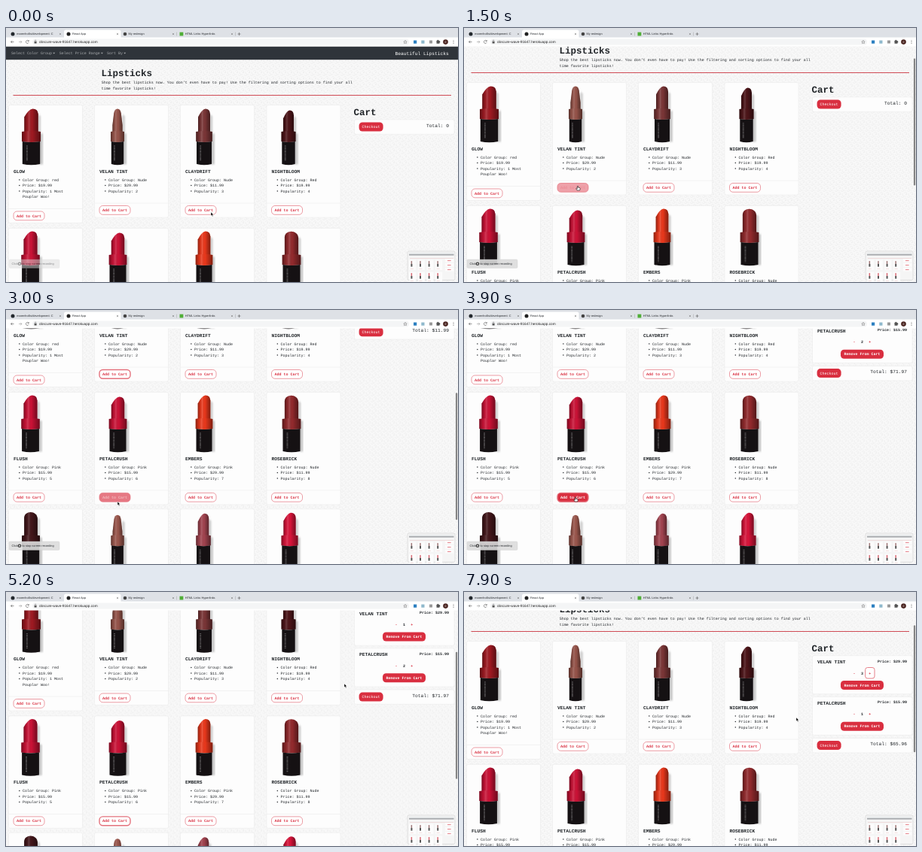
An HTML page that plays this animation: 600x338 px, repeating every 8000 ms.

```html
<!DOCTYPE html>
<html lang="en">
<head>
<meta charset="utf-8">
<title>Lipstick shop</title>
<style>
html, body { margin: 0; width: 100%; height: 100%; overflow: hidden; background: #f6f6f6; }
svg { display: block; width: 600px; height: 338px; }
text { font-family: "Liberation Mono", "Courier New", monospace; text-rendering: geometricPrecision; white-space: pre; }
.sans { font-family: "Liberation Sans", Arial, sans-serif; }
</style>
</head>
<body>
<svg id="stage" viewBox="0 0 600 338"></svg>
<script>
const RED = '#d92f40', INK = '#212529', EDGE = '#e4727d';
const COLS = [3.5, 117.5, 231.5, 346], ROWS = [102.5, 266.4, 421.8];

// name, colour group, price, popularity, tube centre, half width, tip top, colour, shape
const products = [
  ['GLOW', 'red', '19.99', '1 Most', 30, 12.5, 5, '#9f1a22', 0],
  ['VELAN TINT', 'Nude', '29.99', '2', 30.5, 9, 5, '#96544a', 1],
  ['CLAYDRIFT', 'Nude', '11.99', '3', 31.5, 10.8, 5, '#7b3637', 0],
  ['NIGHTBLOOM', 'Red', '19.99', '4', 29, 9.5, 7, '#4d1519', 0],
  ['FLUSH', 'Pink', '15.99', '5', 29, 12.2, 4, '#cb1236', 0],
  ['PETALCRUSH', 'Pink', '15.99', '6', 31, 11.8, 6, '#cb1236', 0],
  ['EMBERS', 'Pink', '29.99', '7', 31.5, 11.3, 4, '#ea381c', 0],
  ['ROSEBRICK', 'Nude', '11.99', '8', 33, 12.3, 4, '#932a2d', 2],
  ['DEEP PLUM', 'Red', '19.99', '9', 29.5, 12, 4, '#43171b', 2],
  ['SOFT CLAY', 'Nude', '29.99', '10', 30.5, 8.7, 8, '#9b574d', 1],
  ['DUSTY TINT', 'Nude', '11.99', '11', 30.5, 9.8, 6, '#a34450', 0],
  ['BRIGHT PINK', 'Pink', '15.99', '12', 30.5, 11, 5, '#d8143a', 0]
];

const text = (x, y, size, str, fill = INK, attrs = '') =>
  `<text x="${x}" y="${y}" font-size="${size}" fill="${fill}" ${attrs}>${str}</text>`;
const bold = (x, y, size, str, fill = INK, attrs = '') => text(x, y, size, str, fill, 'font-weight="700" ' + attrs);
const sans = (x, y, size, str, fill = '#2b2e32') => text(x, y, size, str, fill, 'class="sans"');
const rect = (x, y, w, h, fill, r = 0, attrs = '') =>
  `<rect x="${x}" y="${y}" width="${w}" height="${h}" fill="${fill}" rx="${r}" ${attrs}/>`;
const dot = (x, y, r, fill) => `<circle cx="${x}" cy="${y}" r="${r}" fill="${fill}"/>`;
const line = (d, color, w = .6, attrs = '') =>
  `<path d="${d}" fill="none" stroke="${color}" stroke-width="${w}" ${attrs}/>`;
const group = (id, body, attrs = '') => `<g id="${id}" ${attrs}>${body}</g>`;
const panel = (x, y, w, h) => rect(x, y, w, h, '#fdfdfd', 2, 'stroke="#e4e4e4" stroke-width=".4"');

function lipstick(cx, hw, top, color, shape) {
  const a = hw * .74, b = a * .72;
  const tip = [
    `M${-a} 36V${top + 11}Q${-a * .4} ${top + 1} ${a * .2} ${top}Q${a * .95} ${top} ${a} ${top + 7}V36Z`,
    `M${-a} 36V${top + 22}L${-b} ${top + 6}Q${-b * .8} ${top} 0 ${top}Q${b * .8} ${top} ${b} ${top + 6}L${a} ${top + 22}V36Z`,
    `M${-a} 36V${top + 8}C${-a} ${top - 2} ${a * .9} ${top - 3} ${a} ${top + 9}V36Z`
  ][shape];
  const collar = `M${-hw} 35.5Q0 33.5 ${hw} 35.5V48.5Q0 50.5 ${-hw} 48.5Z`;
  const base = `M${-hw + .8} 48.5Q0 50.5 ${hw - .8} 48.5V78.5Q0 81 ${-hw + .8} 78.5Z`;
  const solid = (d, fill) => `<path d="${d}" fill="${fill}"/><path d="${d}" fill="url(#shade)"/>`;
  return `<g transform="translate(${cx} 0)">`
    + `<path d="M${a} ${top + 7}L${a + 3} ${top + 10}V38H${hw + 3}V79H${a}Z" fill="#777" opacity=".4" filter="url(#soft)"/>`
    + solid(tip, color) + solid(collar, color) + `<path d="${base}" fill="#151113"/>`
    + line(`M${-hw * .45} 54V75`, '#bbb', 2, 'stroke-dasharray=".8 1.1" opacity=".6"')
    + '</g>';
}

function card([name, tone, price, rank, cx, hw, top, color, shape], i) {
  const extra = i ? 0 : 7.5;
  const rows = ['Color Group: ' + tone, 'Price: $' + price, 'Popularity: ' + rank];
  const list = rows.map((s, k) => dot(14.3, 99.6 + k * 7.5, .75, INK) + text(18.5, 101.2 + k * 7.5, 5, s)).join('');
  return `<g transform="translate(${COLS[i % 4]} ${ROWS[i >> 2]})">`
    + panel(0, 0, 98, 149.5 + extra) + lipstick(cx, hw, top, color, shape)
    + bold(6.5, 90.4, 6.25, name) + list + (i ? '' : text(18.5, 123.7, 5, 'Pouplar Woo!'))
    + rect(0, 130.3 + extra, 98, .5, '#e6e6e6')
    + rect(6.5, 134 + extra, 41, 11.8, '#fff', 4.5, `id="btn${i}" stroke="${EDGE}" stroke-width=".7"`)
    + bold(10.5, 141.6 + extra, 5, 'Add to Cart', RED, `id="label${i}"`) + '</g>';
}

const cartItem = (id, name, price) => group(id,
  panel(462.5, 121.7, 132.5, 51) + bold(469, 132, 6.25, name)
  + bold(588, 130.6, 5, 'Price: $' + price, INK, 'text-anchor="end"')
  + (id == 'item0' ? rect(532.7, 137.5, 12.3, 14.5, '#fff', 3, `id="plus" stroke="${EDGE}" stroke-width=".9"`) : '')
  + bold(518, 146.6, 5, '-', RED, 'text-anchor="middle"')
  + bold(528.5, 146.6, 5, '1', INK, `id="${id}n" text-anchor="middle"`)
  + bold(538.7, 146.6, 5, '+', RED, 'text-anchor="middle"')
  + rect(500, 155, 57, 12, RED, 4.5) + bold(504.5, 162.6, 5, 'Remove From Cart', '#fff'));

const caret = x => `<path d="M${x} 32.8h3l-1.5 1.6z" fill="#a8abae"/>`;
const menu = ['Select Color Group', 'Select Price Range', 'Sort By'];
const page = rect(0, 24, 600, 600, 'url(#curl)')
  + rect(0, 24.5, 600, 17.7, '#2f343a')
  + [7, 70.7, 134].map((x, i) => text(x, 35, 5, menu[i], '#a8abae') + caret(x + menu[i].length * 3 + 1.2)).join('')
  + text(516.5, 35.8, 6.25, 'Beautiful Lipsticks', '#fff')
  + bold(126.5, 63.8, 12.5, 'Lipsticks')
  + text(126.8, 74.4, 5, "Shop the best lipsticks now. You don't even have to pay! Use the filtering and sorting options to find your all")
  + text(126.8, 82, 5, 'time favorite lipsticks!')
  + rect(9.5, 89, 581.5, 1, '#cf4a54')
  + products.map(card).join('')
  + bold(461.5, 115.8, 12.5, 'Cart')
  + cartItem('item0', products[1][0], '29.99') + cartItem('item1', products[5][0], '15.99')
  + group('foot', panel(462.5, 122, 132.5, 19.3) + rect(468.6, 125.5, 32, 12, RED, 4.5)
    + text(472.6, 133.2, 5, 'Checkout', '#fff')
    + text(588, 131.5, 6.25, 'Total: 0', INK, 'id="total" text-anchor="end"'));

const cross = x => line(`M${x - 1.1} 6.9l2.2 2.2m0-2.2l-2.2 2.2`, '#666', .5);
const browser = rect(0, 0, 600, 13, '#dee1e6') + rect(0, 12.5, 600, 12, '#fff')
  + rect(77, 2.5, 75.5, 12, '#fff', 2.5)
  + dot(9, 8, 2.5, '#24292e') + sans(14.3, 9.4, 3.9, 'marenhollis/development: C')
  + dot(83, 8, 2.5, '#222') + sans(88, 9.4, 3.9, 'React App')
  + dot(158, 8, 2.3, '#444') + sans(162.5, 9.4, 3.9, 'My redesign')
  + rect(230.5, 5.6, 4.8, 4.8, '#4fae36') + sans(237.7, 9.4, 3.9, 'HTML Links Hyperlinks')
  + [72, 148, 222, 300].map(cross).join('')
  + line('M226.5 5.5v5M304.5 5.5v5', '#999', .4) + line('M307.5 8h4m-2-2v4', '#555')
  + line('M10.5 18.5h-4m1.8-1.8l-1.8 1.8 1.8 1.8', '#555')
  + line('M17 18.5h4m-1.8-1.8l1.8 1.8-1.8 1.8', '#999')
  + line('M30 17.3a2 2 0 1 0 .2 2M30.3 16v1.7h-1.7', '#555')
  + rect(35, 14.6, 500, 8, '#f4f5f6', 4)
  + rect(37.6, 18, 3, 2.6, '#555', .4) + line('M38.2 18v-1a.9.9 0 0 1 1.8 0v1', '#555', .5)
  + sans(44, 20.2, 4.72, 'obscure-wave-91647.herokuapp.com', '#222')
  + line('M530 16.4l.7 1.4 1.5.2-1.1 1 .3 1.5-1.4-.7-1.4.7.3-1.5-1.1-1 1.5-.2z', '#555', .45)
  + rect(541, 16.5, 4.2, 4.2, '#2b7fc0') + rect(551.3, 16.5, 4.2, 4.2, '#8fb9cc') + rect(562, 16.5, 4, 4, '#999')
  + rect(571.5, 16.8, 4, 4, '#555', .5) + dot(575.4, 18.6, 1, '#555') + dot(573.3, 16.7, 1, '#555')
  + dot(583.5, 18.6, 3.3, '#4a2420') + sans(582.5, 19.9, 3.4, 'E', '#fff')
  + [16.8, 18.6, 20.4].map(y => dot(594, y, .5, '#555')).join('');

let preview = rect(533, 297, 63, 38.5, '#f5f5f5', 2, 'stroke="#d9d9d9" stroke-width=".8"')
  + rect(535, 301, 59.5, 1.6, '#a3a6aa') + rect(535, 299, 59.5, 1.8, '#e4e6e8') + rect(536, 306, 58, .4, '#e3b4b4');
for (let i = 0; i < 8; i++) {
  const x = 538.3 + i % 4 * 11.6, y = i < 4 ? 310 : 326;
  preview += rect(x - 3, y - 1.5, 9, 13.5, '#fcfcfc') + rect(x - .7, y, 1.5, 4, i < 4 ? '#a07878' : '#d86a74', .6)
    + rect(x - .9, y + 4, 2, 3.6, '#555') + rect(x - 1.5, y + 10, 4, .4, '#e4b0b0');
}
preview += [309, 315, 321].map(y => rect(583, y - 2, 11.5, 4.8, '#fcfcfc') + rect(586, y, 4.6, 1.1, '#e88992')).join('');

const toast = rect(4, 308, 67, 11.5, '#dcdcdc', 1.5, 'opacity=".9" stroke="#cacaca" stroke-width=".4"')
  + sans(7.6, 315.2, 3.9, 'Click') + dot(18, 313.8, 2.3, '#444') + dot(18, 313.8, 1, '#ddd')
  + sans(21.5, 315.2, 3.95, 'to stop screen recording');

const arrow = '<path d="M0 0V4.8L1.1 3.8 2 5.7 2.9 5.3 2 3.5 3.5 3.4Z" fill="#000" stroke="#fff" stroke-width=".4"/>';
const hand = '<path d="M-.6 .5Q0-.3.6.5V2.2L2.9 2.8Q3.4 3 3.2 4L2.7 6H-.9L-2.3 3.6Q-2 2.7-.6 3.8Z" fill="#fff" stroke="#111" stroke-width=".6"/>';

const $ = id => document.getElementById(id);
$('stage').innerHTML = `<defs>
  <pattern id="curl" width="8" height="8" patternUnits="userSpaceOnUse"><rect width="8" height="8" fill="#f8f8f8"/>
    <path d="M.5 2a1.5 1.5 0 1 1 1.5 1.5H4M4.5 6a1.5 1.5 0 1 0 1.5-1.5V2M0 6H2.5" fill="none" stroke="#ebebeb" stroke-width=".6"/></pattern>
  <linearGradient id="shade"><stop stop-color="#000" stop-opacity=".4"/><stop offset=".2" stop-color="#000" stop-opacity=".08"/>
    <stop offset=".35" stop-color="#fff" stop-opacity=".16"/><stop offset=".55" stop-color="#000" stop-opacity="0"/>
    <stop offset="1" stop-color="#000" stop-opacity=".45"/></linearGradient>
  <filter id="soft"><feGaussianBlur stdDeviation="1"/></filter></defs>`
  + group('page', page) + group('thumb', rect(596.9, 24, 2.3, 169, '#858585', 1.1)) + browser + preview
  + group('toast', toast) + group('cursor', group('arrow', arrow) + group('hand', hand));

// Eased value between keys [time, ...values]
function at(keys, t, k = 1) {
  const i = keys.findIndex(key => key[0] > t);
  if (i < 0) return keys[keys.length - 1][k];
  if (!i) return keys[0][k];
  const [a, b] = [keys[i - 1], keys[i]], u = (t - a[0]) / (b[0] - a[0]);
  return a[k] + (b[k] - a[k]) * u * u * (3 - 2 * u);
}
const within = (t, ...spans) => spans.some(([a, b]) => t >= a && t < b);

const scrollKeys = [[500, 0], [1400, 30], [2400, 30], [2900, 157], [4800, 157], [5200, 101.5], [7700, 101.5], [7900, 37]];
const thumbKeys = [[500, 0], [600, 1], [1700, 1], [2000, 0], [2300, 0], [2400, 1], [3400, 1], [3700, 0],
  [4800, 0], [4900, 1], [5600, 1], [5900, 0], [7700, 0], [7800, 1]];
const toastKeys = [[0, .55], [600, 1], [4200, 1], [4800, .15], [5000, 0]];
const cursorKeys = [[600, 272, 245], [1400, 151, 210], [2400, 151, 210], [2800, 148, 255], [3000, 148, 255],
  [3200, 148, 249], [4100, 148, 249], [4700, 449, 122], [5300, 449, 122], [5800, 518, 96],
  [6100, 518, 96], [6500, 538, 43], [7200, 538, 43], [7700, 441, 167]];
const hoverKeys = { 1: [[1400, 0], [1500, .45], [1600, 1], [2400, 1], [2600, 0]],
  5: [[2900, 0], [3000, .65], [3100, 1], [4100, 1], [4300, 0]] };

const show = (id, on) => $(id).setAttribute('visibility', on ? 'inherit' : 'hidden');
const move = (id, x, y) => $(id).setAttribute('transform', `translate(${x} ${y})`);
const mix = (a, b, u) => `rgb(${a.map((v, i) => Math.round(v + (b[i] - v) * u))})`;
const red = [217, 47, 64], white = [255, 255, 255];

function button(i, t, focus) {
  const h = at(hoverKeys[i], t);
  $('btn' + i).setAttribute('fill', mix(white, red, h));
  $('btn' + i).setAttribute('stroke-width', focus ? 1.4 : .7);
  $('label' + i).setAttribute('fill', mix(red, white, h));
}

function draw(t) {
  const scroll = at(scrollKeys, t);
  const first = (t >= 1900) + (t >= 6600) + (t >= 7100);
  const second = (t >= 3300) + (t >= 3800) - (t >= 6000);
  move('page', 0, -scroll);
  move('thumb', 0, scroll * .55);
  $('thumb').setAttribute('opacity', at(thumbKeys, t));
  $('toast').setAttribute('opacity', at(toastKeys, t));
  button(1, t, t >= 1700 && t < 3200);
  button(5, t, t >= 3200 && t < 6000);

  show('item0', first);
  show('item1', second);
  $('plus').setAttribute('opacity', t >= 6600 ? 1 : 0);
  $('plus').setAttribute('fill', t < 7200 ? '#fbe9ea' : '#fff');
  $('item0n').textContent = first;
  $('item1n').textContent = second;
  move('item1', 0, 54.8);
  move('foot', 0, 54.8 * (!!first + !!second));
  // The shop's own sums use these unit prices
  const sum = first * 11.99 + second * 29.99;
  $('total').textContent = 'Total: ' + (sum ? '$' + sum.toFixed(2) : 0);

  move('cursor', at(cursorKeys, t), at(cursorKeys, t, 2));
  const pointing = within(t, [1400, 2400], [3100, 4200], [5800, 6200], [6500, 7300]);
  show('hand', pointing);
  show('arrow', !pointing);
}

function tick(now) {
  const t = now % 8000;
  draw(t < 300 ? 0 : t < 600 ? 300 : Math.floor(t / 100) * 100);
  requestAnimationFrame(tick);
}
draw(0);
requestAnimationFrame(tick);
</script>
</body>
</html>
```
